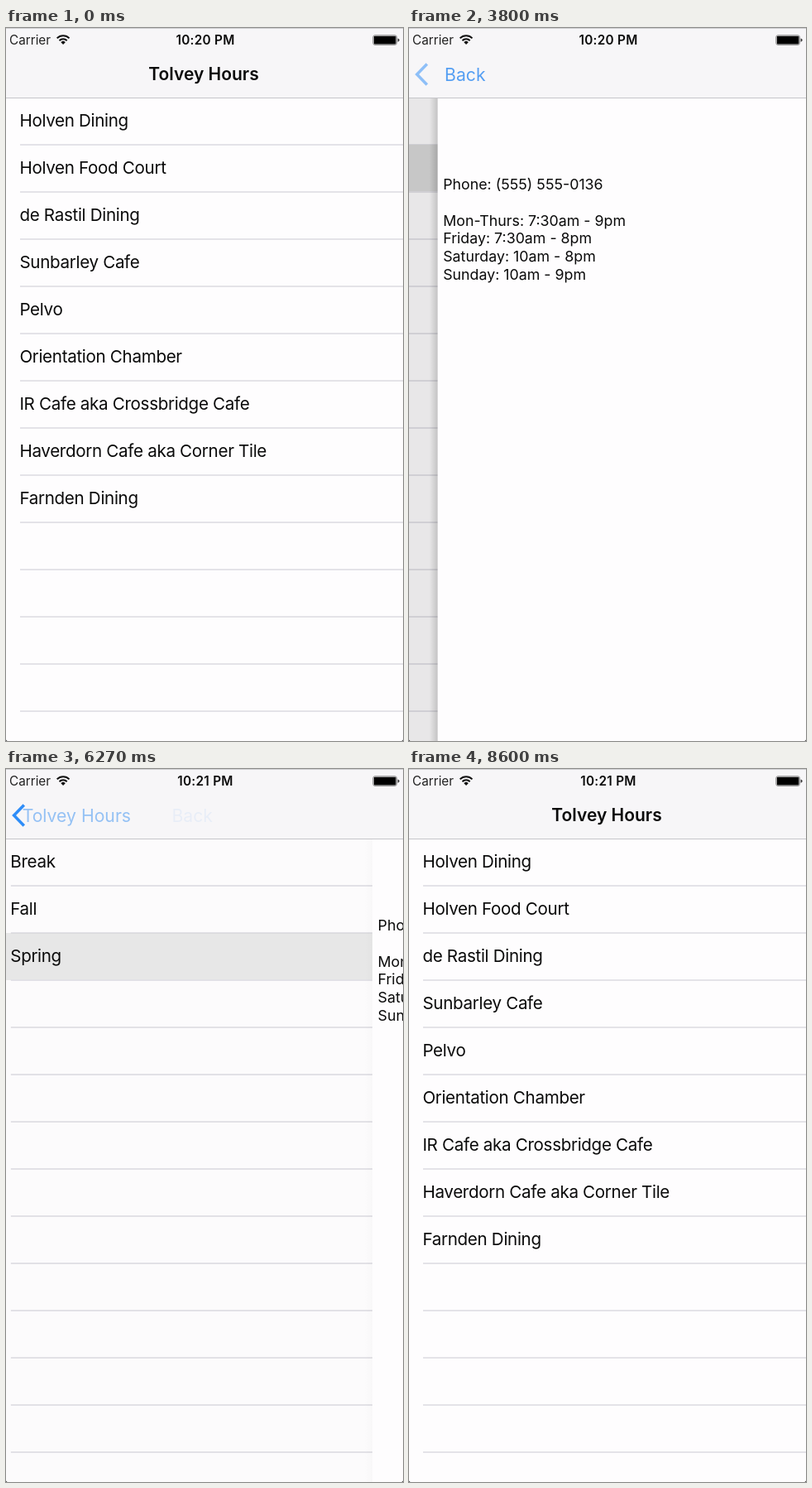
Write an HTML page that moves like this. It is 480 px wide and 861 px high and loops after 9670 ms.

```html
<!DOCTYPE html>
<html lang="en">
<head>
<meta charset="utf-8">
<title>Opening hours</title>
<style>
html, body { margin: 0; width: 100%; height: 100%; overflow: hidden; background: #333; }
#stage {
  position: relative; width: 480px; height: 861px; overflow: hidden;
  background: #fefdfe; border-radius: 0 0 3px 3px; color: #0a0a0a;
  font: 20.6px/56px Inter, "Liberation Sans", sans-serif;
}
#stage div, #stage svg { position: absolute; white-space: pre; }
.page { top: 84px; left: 0; width: 480px; height: 777px; background: #fefdfe; }
.page::before {
  content: ""; position: absolute; left: -10px; width: 10px; height: 100%;
  background: linear-gradient(90deg, transparent, #000); opacity: var(--shade, 0);
}
.row { left: 0; width: 480px; height: 57px; letter-spacing: -.32px; }
.row .fill { inset: 0; background: #d9d9d9; opacity: 0; }
.row .text { left: 16.4px; top: 0; }
.row .line { left: 17px; right: 0; top: 56px; height: 2px; background: #e4e3e8; }
.info { left: 6.6px; top: 94px; font-size: 17.8px; line-height: 21.75px; }
.dim { inset: 0; background: #000; opacity: 0; }
#bar { left: 0; top: 0; width: 480px; height: 84px; background: #f7f6f8; border-bottom: 1px solid #c6c6ca; }
#edge { left: 0; top: 0; width: 480px; height: 1px; background: #cfcfd1; }
.label { left: 29.7px; top: 28px; font-size: 21.2px; color: #167df0; }
#title { left: 0; top: 28px; width: 478px; text-align: center; font-size: 21px; font-weight: 600; }
#chevron { left: 0; top: 36px; }
.status { top: 5px; font-size: 15.3px; line-height: 20px; }
#carrier { left: 4px; color: #222; }
#clock { left: 0; width: 482px; text-align: center; font-weight: 600; letter-spacing: .28px; }
#icons { left: 0; top: 0; }
</style>
</head>
<body>
<div id="stage">
  <div class="page" id="root"></div>
  <div class="page" id="terms"></div>
  <div class="page" id="detail"><div class="info">Phone: (555) 555-0136

Mon-Thurs: 7:30am - 9pm
Friday: 7:30am - 8pm
Saturday: 10am - 8pm
Sunday: 10am - 9pm</div></div>
  <div id="bar"></div>
  <div id="title">Tolvey Hours</div>
  <div class="label" id="home">Tolvey Hours</div>
  <div class="label" id="back">Back</div>
  <svg id="chevron" width="30" height="40" fill="none" stroke="#0f7df8" stroke-width="3.5">
    <path d="M21.8 7.5 9.6 20 21.8 32.5"/>
  </svg>
  <div class="status" id="carrier">Carrier</div>
  <div class="status" id="clock">10:20 PM</div>
  <svg id="icons" width="480" height="28" fill="none" stroke="#111">
    <path stroke-width="2" d="M61.7 12.4a10.4 10.4 0 0 1 14.8 0M64.5 15.2a6.5 6.5 0 0 1 9.2 0"/>
    <path fill="#111" stroke="none" d="M66.4 17.2a3.8 3.8 0 0 1 5.4 0L69.1 20z"/>
    <rect x="443.8" y="8.8" width="28.6" height="11.6" rx="2.2" stroke="#888"/>
    <rect x="444.8" y="9.8" width="26.6" height="9.6" rx="1" fill="#000" stroke="none"/>
    <path fill="#333" stroke="none" d="M473.6 12.4q2 .4 2 2.2t-2 2.2z"/>
  </svg>
  <div id="edge"></div>
</div>
<script>
const LOOP = 9670, FPS = 15, WIDTH = 480, ROWS = 14;
const $ = id => document.getElementById(id);
const pages = ["root", "terms", "detail"].map($);

// over: depth of the page that slides; row: highlighted row beneath it
const moves = [
  { press: 1266, at: 1344, over: 1, row: 0, push: true },
  { press: 2266, at: 2267, over: 2, row: 1, push: true },
  { press: 3666, at: 3776, over: 2, row: 1 },
  { press: 4840, at: 4842, over: 2, row: 2, push: true },
  { press: 5930, at: 6036, over: 2, row: 2 },
  { press: 7199, at: 7306, over: 1, row: 0 }
];

function add(parent, name, text = "") {
  const el = document.createElement("div");
  el.className = name;
  el.textContent = text;
  return parent.appendChild(el);
}

function fillList(page, names) {
  for (let i = 0; i < ROWS; i++) {
    const row = add(page, "row");
    row.style.top = i * 57 + "px";
    add(row, "fill");
    add(row, "text", names[i]);
    add(row, "line");
  }
  add(page, "dim");
}

fillList(pages[0], ["Holven Dining", "Holven Food Court", "de Rastil Dining", "Sunbarley Cafe",
  "Pelvo", "Orientation Chamber", "IR Cafe aka Crossbridge Cafe",
  "Haverdorn Cafe aka Corner Tile", "Farnden Dining"]);
fillList(pages[1], ["Break", "Fall", "Spring"]);

const ramp = (t, a, b) => Math.min(1, Math.max(0, (t - a) / (b - a)));

// Critically damped spring: the distance still to go, from 1 to 0
function remaining(ms) {
  const x = Math.max(0, ms) * .01826;
  return (1 + x) * Math.exp(-x);
}

function place(el, x, alpha) {
  el.style.transform = `translateX(${x}px)`;
  el.style.opacity = alpha;
}

function drawPages(move, q, dt) {
  const under = pages[move.over - 1], over = pages[move.over];
  for (const page of pages) page.style.display = page === under || page === over ? "" : "none";
  place(under, -.3 * WIDTH * (1 - q), 1);
  place(over, q * WIDTH, 1);
  over.style.setProperty("--shade", (move.push ? .05 : .17) * (1 - q));
  under.style.setProperty("--shade", 0);
  under.querySelector(".dim").style.opacity = .095 * (1 - q);
  const glow = move.push ? 1 : 1 - ramp(dt, 0, 500);
  under.querySelectorAll(".fill").forEach((el, i) => el.style.opacity = i === move.row ? glow : 0);
  over.querySelectorAll(".fill").forEach(el => el.style.opacity = 0);
  const dim = over.querySelector(".dim");
  if (dim) dim.style.opacity = 0;
}

function drawBar({ over, push }, q, dt) {
  const leave = .8 * (1 - ramp(dt, 0, 250));
  const enter = ramp(dt, 100, 400);
  if (over === 1) {
    const show = ramp(dt, 180, 500);
    place($("home"), 141 * q, push ? show : leave);
    place($("title"), -141 * (1 - q), push ? 1 - ramp(dt, 0, 200) : enter);
    place($("back"), 0, 0);
    place($("chevron"), 0, push ? show : .45 * (1 - ramp(dt, 0, 300)));
  } else {
    place($("home"), -130 * q, push ? 0 : enter);
    if (push) place($("home"), -130 * (1 - q), 1 - ramp(dt, 0, 150));
    else place($("home"), -130 * (1 - q), enter);
    place($("title"), 0, 0);
    place($("back"), (push ? 248 : 185) * q, push ? ramp(dt, 0, 250) : leave);
    place($("chevron"), 0, push ? 1 : .4 + .6 * ramp(dt, 0, 300));
  }
}

function draw(now) {
  const t = Math.floor((now % LOOP + 1) * FPS / 1000) * 1000 / FPS;
  let move = moves.filter(m => m.press <= t).pop(), dt;
  if (move) dt = t - move.at;
  else {
    move = moves[moves.length - 1];
    dt = t + LOOP - move.at;
  }
  const r = remaining(dt), q = move.push ? r : 1 - r;
  drawPages(move, q, dt);
  drawBar(move, q, dt);
  $("clock").textContent = t < 4200 ? "10:20 PM" : "10:21 PM";
}

const start = performance.now();
function tick() {
  draw(performance.now() - start);
  requestAnimationFrame(tick);
}
tick();
</script>
</body>
</html>
```
